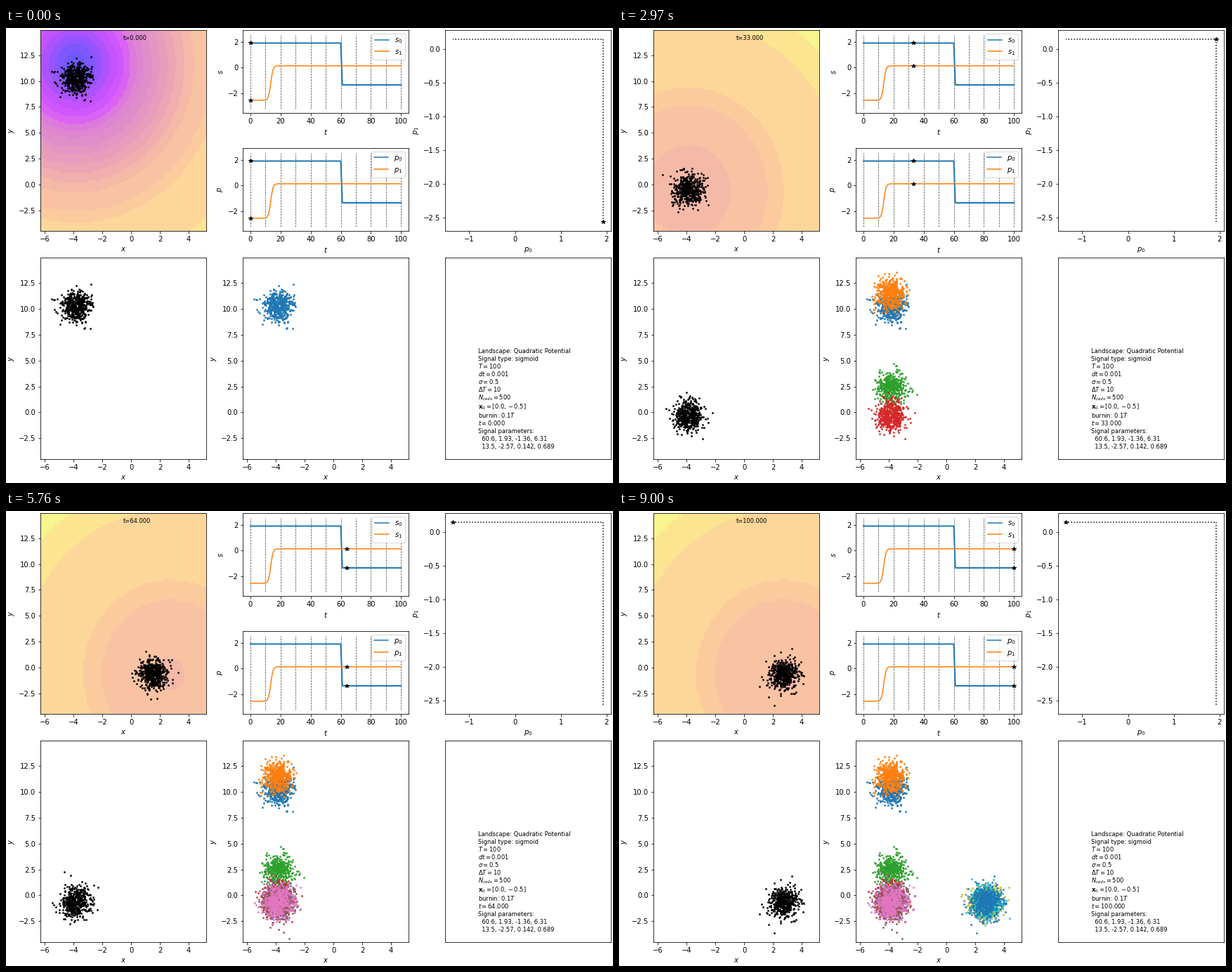
A matplotlib script for the animation above (9090 ms loop, 864 px wide and 648 px high).

```python
import numpy as np
import matplotlib.pyplot as plt
from matplotlib.animation import FuncAnimation
from matplotlib.colors import LinearSegmentedColormap

W, H = 864, 648
T_END, GAP, CELLS = 100, 10, 500
SIGMA = 0.5
TAU = np.array([2.0, 4.5])
XLIM, YLIM = (-6.3, 5.23), (-4.48, 14.91)

# Panel edges in pixels: (left, right) and (top, bottom)
COLS = [(49.2 + 288 * i, 285 + 288 * i) for i in range(3)]
ROWS = [(3, 289.4), (327.24, 613.6)]
HALF_ROWS = [(3, 121.4), (171, 289.4)]

# Rows: switch time, start, end, rate
SIGNALS = np.array([[60.6, 1.93, -1.36, 6.31],
                    [13.5, -2.57, 0.142, 0.689]])


def signal(t):
    switch, start, end, rate = SIGNALS.T
    phase = np.tanh(rate * (np.asarray(t)[..., None] - switch))
    return start + (end - start) * (1 + phase) / 2


def simulate(rng, burnin=10, substeps=50):
    """Cells drifting in the quadratic well, one state per unit of time."""
    pos = np.tile([0.0, -0.5], (CELLS, 1))
    spread = SIGMA * np.sqrt(TAU / 2 * (1 - np.exp(-2 / TAU)))
    states = []
    for t in range(-burnin, T_END + 1):
        if t >= 0:
            states.append(pos.copy())
        for k in range(substeps):
            force = signal(max(t + k / substeps, 0))
            pos = pos - (pos / TAU + force) / substeps
        pos = pos + spread * rng.standard_normal(pos.shape)
    return states


# Landscape colouring on a logarithmic scale
CMAP = LinearSegmentedColormap.from_list("well", [
    (0.00, "#6a5afc"), (0.05, "#7b58fd"), (0.10, "#9055fe"),
    (0.17, "#a854fe"), (0.23, "#c353ff"), (0.30, "#d058fd"),
    (0.36, "#df68f2"), (0.40, "#dd82d6"), (0.50, "#e292c6"),
    (0.60, "#eca6b4"), (0.67, "#f5b9a9"), (0.723, "#f9c3a4"),
    (0.771, "#fbcb9f"), (0.85, "#fdd79a"), (0.94, "#fde592"),
    (0.982, "#f8f48e"), (1.00, "#f8f48e")], N=512)
EDGES = np.array([0, .03, .09, .15, .21, .27, .32, .37, .41, .45, .5, .54,
                  .58, .617, .655, .692, .755, .788, .915, .965, 1])
MIDS = (EDGES[:-1] + EDGES[1:]) / 2


def cell_centres(lim, n=100):
    step = (lim[1] - lim[0]) / n
    return lim[0] + step * (np.arange(n) + 0.5)


GX, GY = np.meshgrid(cell_centres(XLIM), cell_centres(YLIM))


def well_depth(p):
    return -np.sum(TAU * p ** 2) / 2


LOWEST = well_depth(signal(0))


def landscape(p):
    phi = GX ** 2 / (2 * TAU[0]) + GY ** 2 / (2 * TAU[1]) + p[0] * GX + p[1] * GY
    level = np.log1p(np.maximum(phi - LOWEST, 0)) / np.log(65)
    return MIDS[np.digitize(level, EDGES[1:-1])]


fig = plt.figure(figsize=(W / 72, H / 72), dpi=72)


def panel(col, row, xlabel="", ylabel=""):
    (left, right), (top, bottom) = col, row
    ax = fig.add_axes([left / W, 1 - bottom / H,
                       (right - left) / W, (bottom - top) / H])
    ax.set_xlabel(xlabel)
    ax.set_ylabel(ylabel)
    return ax


def cell_panel(col, row):
    ax = panel(col, row, "$x$", "$y$")
    ax.set_xticks(np.arange(-6, 5, 2))
    ax.set_yticks(np.arange(-2.5, 13, 2.5))
    ax.set_xlim(XLIM)
    ax.set_ylim(YLIM)
    return ax


def dots(ax, color):
    return ax.plot([], [], ".", color=color, ms=4, alpha=0.8)[0]


def star(ax):
    return ax.plot([], [], "k*", ms=6, zorder=4)[0]


times = np.arange(T_END + 1)
values = signal(times)
states = simulate(np.random.default_rng(7))


def signal_panel(row, name):
    ax = panel(COLS[1], row, "$t$", f"${name}$")
    for i, width in enumerate((2, 1.5)):
        ax.plot(times, values[:, i], lw=width, label=f"${name}_{i}$")
    ax.vlines(times[::GAP], -3.25, 2.55, colors="k", linestyles="--",
              linewidth=0.75, alpha=0.7, zorder=1)
    ax.set_xlim(-5, 105)
    ax.set_ylim(-3.59, 2.95)
    ax.set_yticks([-2, 0, 2])
    legend = ax.legend(loc="upper right")
    plt.setp(legend.get_lines(), linewidth=1.5)
    return star(ax)


# Landscape with live cells
ax_well = cell_panel(COLS[0], ROWS[0])
image = ax_well.imshow(landscape(values[0]), origin="lower", aspect="auto",
                       extent=(*XLIM, *YLIM), cmap=CMAP, vmin=0, vmax=1,
                       interpolation="nearest")
live = dots(ax_well, "k")
clock = ax_well.text(0.5, 0.95, "", fontsize="small",
                     transform=ax_well.transAxes)

# Signals and parameters over time
time_stars = [signal_panel(row, name) for row, name in zip(HALF_ROWS, "sp")]

# Path through parameter space
ax_path = panel(COLS[2], ROWS[0], "$p_0$", "$p_1$")
ax_path.plot(*values.T, "k:")
ax_path.set_xlim(-1.5245, 2.0945)
ax_path.set_ylim(-2.7056, 0.2776)
ax_path.set_xticks([-1, 0, 1, 2])
ax_path.set_yticks(np.arange(-2.5, 0.1, 0.5))
path_star = star(ax_path)

# Latest snapshot, and all snapshots so far
latest = dots(cell_panel(COLS[0], ROWS[1]), "k")
ax_all = cell_panel(COLS[1], ROWS[1])
snapshots = []
for i, state in enumerate(states[::GAP]):
    layer = dots(ax_all, f"C{i % 10}")
    layer.set_data(*state.T)
    snapshots.append(layer)

# Run summary
ax_info = panel(COLS[2], ROWS[1])
ax_info.set_xticks([])
ax_info.set_yticks([])


def summary(t):
    rows = ["  " + ", ".join(f"{v:.3g}" for v in row) for row in SIGNALS]
    return [
        "Landscape: Quadratic Potential",
        "Signal type: sigmoid",
        f"$T={T_END}$",
        "$dt=0.001$",
        rf"$\sigma={SIGMA}$",
        rf"$\Delta T={GAP}$",
        f"$N_{{cells}}={CELLS}$",
        r"$\mathbf{x}_0=[0.0, -0.5]$",
        "burnin: $0.1T$",
        f"$t={t:.3f}$",
        "Signal parameters:",
        *rows]


def write_lines(lines, step=11, subscript_drop=2):
    """Stack lines upwards from the panel's foot."""
    texts, rise = [], 0
    for above, line in zip([""] + lines[:-1], lines):
        texts.append([line, step + subscript_drop * ("_" in above)])
    artists = []
    for line, height in reversed(texts):
        artists.append(ax_info.annotate(
            line, (0.2, 0.05), xycoords="axes fraction", xytext=(0, rise),
            textcoords="offset points", fontsize="small"))
        rise += height
    return artists[::-1]


info = write_lines(summary(0))


def update(t):
    p = values[t]
    image.set_data(landscape(p))
    live.set_data(*states[t].T)
    clock.set_text(f"t={t:.3f}")
    for marks in time_stars:
        marks.set_data([t, t], p)
    path_star.set_data([p[0]], [p[1]])
    latest.set_data(*states[t - t % GAP].T)
    for i, layer in enumerate(snapshots):
        layer.set_visible(i * GAP <= t)
    for artist, line in zip(info, summary(t)):
        artist.set_text(line)
    return []


anim = FuncAnimation(fig, update, frames=T_END + 1, interval=90,
                     init_func=lambda: update(0), repeat=True,
                     repeat_delay=0, blit=False)
plt.show()
```
